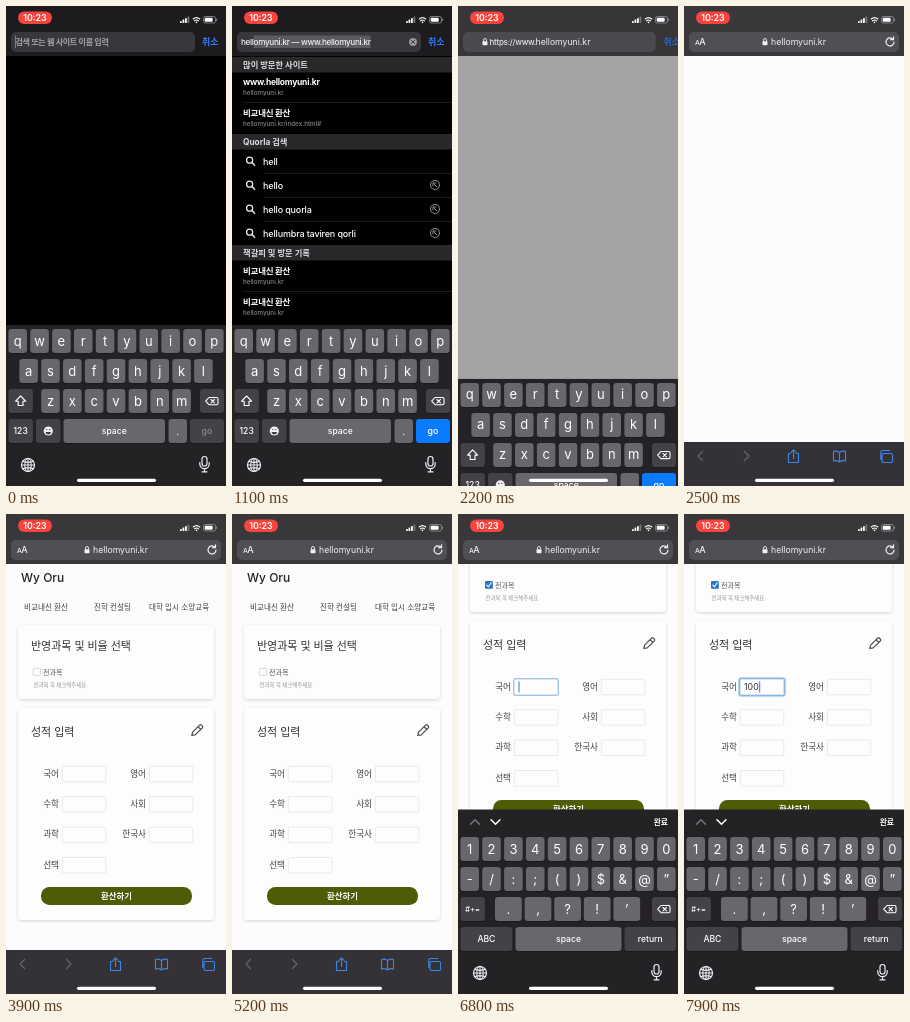
An HTML page that plays this animation: 220 by 480 pixels, repeating every 8000 ms.

```html
<!DOCTYPE html>
<html lang="ko">
<head>
<meta charset="utf-8">
<title>Grade form on a phone</title>
<style>
html, body { margin: 0; width: 100%; height: 100%; overflow: hidden; background: #000; }
svg { display: block; width: 100vw; height: 100vh; }
text { font-family: Inter, "Noto Sans CJK KR", "Noto Sans CJK", sans-serif; white-space: pre; }
.line { fill: none; stroke-linecap: round; stroke-linejoin: round; }
</style>
</head>
<body>
<svg id="stage" viewBox="0 0 220 480" preserveAspectRatio="none"></svg>
<script>
const LOOP = 8000, STEP = 100;
const DOMAIN = 'hellomyuni.kr';
const KEY = '#69676b', DARK = '#444246', BLUE = '#0a7aff';

// Drawing helpers
const rect = (x, y, w, h, fill, r = 0, more = '') =>
  `<rect x="${x}" y="${y}" width="${w}" height="${h}" rx="${r}" fill="${fill}" ${more}/>`;
const text = (x, y, size, str, fill = '#fff', more = '') =>
  `<text x="${x}" y="${y}" font-size="${size}" fill="${fill}" ${more}>${str}</text>`;
const line = (d, color = '#fff', w = 1) =>
  `<path class="line" d="${d}" stroke="${color}" stroke-width="${w}"/>`;
const dot = (x, y, r, fill) => `<circle cx="${x}" cy="${y}" r="${r}" fill="${fill}"/>`;
const ring = (x, y, r, color, w = 1) =>
  `<circle cx="${x}" cy="${y}" r="${r}" fill="none" stroke="${color}" stroke-width="${w}"/>`;
const group = (id, body) => `<g id="${id}">${body}</g>`;
const MID = 'text-anchor="middle"', END = 'text-anchor="end"';
const BOLD = 'font-weight="700"', SEMI = 'font-weight="600"', MEDIUM = 'font-weight="500"';

const lock = (x, y) => rect(x - 2.5, y - .8, 5, 4, '#f2f0f4', .8) +
  line(`M${x - 1.5} ${y - .8}v-1.2a1.5 1.5 0 0 1 3 0v1.2`, '#f2f0f4', .9);

// Keyboards
const SPAN = 21.85;
const rowY = [323, 353, 383, 413];
const keyX = (i, inset = 0) => 2.4 + inset + i * SPAN;

function key(x, row, w, label, fill = KEY, size = 13, color = '#fff') {
  const y = rowY[row];
  return rect(x, y + .8, w, 24, '#19171a', 3.2) + rect(x, y, w, 24, fill, 3.2) +
    text(x + w / 2, y + 12 + size * .35, size, label, color, `${MID} ${size < 10 ? MEDIUM : ''}`);
}
const keyRow = (chars, row, inset = 0) =>
  [...chars].map((c, i) => key(keyX(i, inset), row, 18.6, c === '&' ? '&amp;' : c)).join('');

const backspace = key(194, 2, 24, '', DARK) +
  line('M203 391.5h7.6q1.4 0 1.4 1.4v4.4q0 1.4-1.4 1.4H203l-3.3-3.6zM205 393.5l3.4 3.4m0-3.4l-3.4 3.4', '#fff', 1.1);
const globe = ring(22, 459, 6.5, '#f0eef2', 1.2) +
  line('M15.4 459h13.2M22 452.4v13.2M16.7 455.2q5.3 2.4 10.6 0M16.7 462.8q5.3-2.4 10.6 0', '#f0eef2', 1.1) +
  '<ellipse cx="22" cy="459" rx="3.2" ry="6.5" fill="none" stroke="#f0eef2" stroke-width="1.1"/>';
const mic = rect(196, 450.5, 5, 9.5, 'none', 2.5, 'stroke="#f0eef2" stroke-width="1.2"') +
  line('M193.8 456.5v1.5a4.7 4.7 0 0 0 9.4 0v-1.5M198.5 462.8v3M196 465.8h5', '#f0eef2', 1.2);
const emoji = dot(42.3, 425, 4.6, '#f2f0f4') + dot(40.8, 423.6, .7, DARK) + dot(43.8, 423.6, .7, DARK) +
  `<path d="M39.6 426h5.4a2.7 2.4 0 0 1-5.4 0z" fill="${DARK}"/>`;

const letters = rect(0, 319, 220, 161, '#252226') +
  keyRow('qwertyuiop', 0) + keyRow('asdfghjkl', 1, SPAN / 2) + keyRow('zxcvbnm', 2, SPAN * 1.5) +
  key(2.4, 2, 24.5, '', DARK) + line('M14.6 390l5 5.2h-2.6v4.3h-4.8v-4.3h-2.6z', '#fff', 1.1) +
  backspace + key(2.4, 3, 24.5, '123', DARK, 8.6) + key(30, 3, 24.5, '', DARK) + emoji +
  key(57.5, 3, 101.5, 'space', KEY, 8.6) + key(162.5, 3, 18.5, '.', KEY, 10) +
  group('goOff', key(184, 3, 34, 'go', DARK, 8.8, '#89878b')) +
  group('goOn', key(184, 3, 34, 'go', BLUE, 8.8)) + globe + mic;

const numbers = rect(0, 295.5, 220, 184.5, '#252226') +
  line('M12.5 310.3l4.5-4.6 4.5 4.6', '#79777b', 1.5) +
  line('M33 305.7l4.5 4.6 4.5-4.6', '#fff', 1.5) +
  text(210, 311, 7.8, '완료', '#fff', `${BOLD} ${END}`) +
  keyRow('1234567890', 0) + keyRow('-/:;()$&@”', 1) + key(2.4, 2, 24.5, '#+=', DARK, 7.4) +
  [...'.,?!’'].map((c, i) => key(37 + i * 29.6, 2, 26.8, c)).join('') + backspace +
  key(2.4, 3, 52, 'ABC', DARK, 8.6) + key(57.5, 3, 106, 'space', KEY, 8.6) +
  key(166.5, 3, 51.5, 'return', DARK, 8.6) + globe + mic;

function balloon(char, x, row) {
  const y = rowY[row], left = Math.min(Math.max(x - 5, 2), 189.5);
  return rect(x, y - 8, 18.6, 32, KEY, 3.2) + rect(left, y - 33, 28.6, 30, KEY, 5) +
    text(left + 14.3, y - 11.5, 18, char, '#fff', MID);
}

// Suggestion list
const header = (y, str) => rect(0, y, 220, 15.5, '#2a282b') + text(11, y + 10.7, 8.3, str, '#dddbdf', BOLD);
const bookmark = (y, title, url) => text(11, y, 8.5, title, '#fff', `${BOLD} letter-spacing="-.25"`) +
  text(11, y + 10, 6.2, url, '#77757a', SEMI);
const rule = (x, y) => rect(x, y, 220 - x, .6, '#2d2b2e');
const query = (y, str, id) => ring(17.6, y - 4.8, 3, '#e4e2e6', 1.3) +
  line(`M20 ${y - 2.4}l2.6 2.6`, '#e4e2e6', 1.5) +
  text(31, y - .5, 9, str, '#fff', `${id ? `id="${id}" ` : ''}${MEDIUM} letter-spacing="-.15"`);
const fillIn = y => ring(203, y, 4.5, '#8b898d', 1.1) + line(`M205 ${y + 2}l-4-4m0 3v-3h3`, '#8b898d');

const list = header(51, '많이 방문한 사이트') + bookmark(79, 'www.' + DOMAIN, DOMAIN) + rule(11, 96) +
  bookmark(109.5, '비교내신 환산', DOMAIN + '/index.html#') +
  header(128, 'Quorla 검색') + query(159, 'hell', 'typed') + query(183, 'hello') +
  query(207, 'hello quorla') + query(231, 'hellumbra taviren qorli') +
  [167, 191, 215].map(y => rule(31, y)).join('') + [179, 203, 227].map(fillIn).join('') +
  header(239, '책갈피 및 방문 기록') + bookmark(268, '비교내신 환산', DOMAIN) + rule(11, 285) +
  bookmark(299, '비교내신 환산', DOMAIN);

// Web page
const card = (y, h) => rect(12, y, 196, h, '#fefdfe', 4, 'filter="url(#shade)"');
const field = (x, y, label) => text(x - 3, y + 10.5, 8.6, label, '#454345', END) +
  rect(x + .3, y + .3, 43.5, 15.5, '#fefdfe', .5, 'stroke="#e6e4e7" stroke-width=".8"');
const rows = [['국어', '영어'], ['수학', '사회'], ['과학', '한국사'], ['선택']];

const page = text(15, 68, 12, 'Wy Oru', '#222', MEDIUM) +
  text(18, 96, 7.6, '비교내신 환산', '#444') + text(88, 96, 7.6, '진학 컨설팅', '#444') +
  text(143, 96, 7.6, '대학 입시 소양교육', '#444') +
  card(111, 74) + text(25, 136, 11, '반영과목 및 비율 선택', '#333', MEDIUM) +
  rect(27.4, 154.4, 7, 7, '#fff', .8, 'stroke="#c9c7c9" stroke-width=".7"') +
  group('check', rect(27, 154, 7.8, 7.8, '#2878c8', 1) + line('M28.8 158l1.6 1.8 2.8-4', '#fff', 1.1)) +
  text(37, 160.8, 7, '전과목', '#555') + text(27.5, 173, 5.4, '전과목 꼭 체크해주세요.', '#959395') +
  card(194, 212) + text(25, 222, 11, '성적 입력', '#333', MEDIUM) +
  line('M185.8 221.5l.8-3.4 7-7q1-.8 2 .2l.8.8q.8 1 0 1.8l-7.2 7zM192 212.7l2.8 2.8', '#4c4a4c', 1.2) +
  rows.map((r, i) => r.map((s, j) => field(56 + j * 87, 252 + i * 30.4, s)).join('')).join('') +
  group('focus', rect(55.5, 251.5, 45, 17, '#fff', 1.5, 'id="glow" stroke="#a5cbee" stroke-width="2.6"') +
    rect(55.8, 251.8, 44.4, 16.4, '#fefdfe', 1, 'stroke="#6ea5d8" stroke-width=".9"') +
    text(60, 263.2, 8.8, '', '#333', 'id="score"') + rect(60.5, 254.5, 1, 11, '#3d72d6', 0, 'id="scoreCaret"')) +
  rect(35, 373, 151, 18, '#4d5c05', 8.5) + text(110.5, 385, 8.4, '환산하기', '#fff', `${SEMI} ${MID}`);

const toolbar = rect(0, 436, 220, 44, '#343236') +
  line('M18.5 445.5l-4.5 4.5 4.5 4.5M60.5 445.5l4.5 4.5-4.5 4.5', '#67656a', 1.2) +
  line('M106.500 447.500h-2v9h10v-9h-2M109.500 452.500v-8.500m-2.500 2.300l2.500-2.500 2.500 2.500'.replace(/00\b/g, '') +
    'M155.5 446.5q-3-2-6-1v9.5q3-1 6 1 3-2 6-1v-9.5q-3-1-6 1v9.5' +
    'M199.5 447.5h7.5q1.5 0 1.5 1.5v6q0 1.5-1.5 1.5h-7.5q-1.5 0-1.5-1.5v-6q0-1.5 1.5-1.5z' +
    'M196.8 453.5v-7q0-2 2-2h7', '#3c86e8', 1.1);

// Top bar
const status = rect(12, 5.5, 34, 12.5, '#f8443c', 6.2) + text(29, 15, 8.8, '10:23', '#fff', `${SEMI} ${MID}`) +
  [2, 3.5, 5, 6.5].map((h, i) => rect(174 + i * 2.5, 17 - h, 1.8, h, i < 3 ? '#fff' : '#77757a', .4)).join('') +
  line('M187.2 13q3.3-2.8 6.6 0M188.6 14.8q1.9-1.5 3.8 0', '#fff', 1.1) + dot(190.5, 16.4, .8, '#fff') +
  rect(197.5, 10.5, 12, 6.5, 'none', 1.8, 'stroke="#96949a" stroke-width=".8"') +
  rect(198.7, 11.7, 8, 4.1, '#fff', 1) + rect(210.2, 12.6, .9, 2.3, '#96949a', .4);

const topBar = rect(0, 0, 220, 50, '#1d1b1e') + rect(0, 0, 220, 50, '#39373a', 0, 'id="barLight"') + status +
  rect(5, 26, 184, 20, '#39373b', 5, 'id="box"') + rect(5, 26, 184, 20, '#514f53', 5, 'id="boxLight"') +
  group('entry',
    text(9.5, 39, 8.1, '검색 또는 웹 사이트 이름 입력', '#a3a1a6', `id="hint" ${BOLD} letter-spacing="-.35"`) +
    rect(9, 29.5, .8, 12.5, '#8f929c', 0, 'id="caret"') +
    group('auto', rect(21, 29.5, 117, 12.5, '#5b5a60', 0, 'id="mark"') +
      text(9, 39, 8.2, `${DOMAIN} — www.${DOMAIN}`, '#f2f0f4', `id="url" ${MEDIUM} letter-spacing="-.33"`) +
      dot(181, 36, 3.9, '#98969b') + line('M179.5 34.5l3 3m0-3l-3 3', '#39373b', .9))) +
  group('prefix', lock(27, 36) + text(78, 39, 8, 'https://www.', '#e6e4e8', `${END} ${MEDIUM} letter-spacing="-.25"`)) +
  text(77.5, 39, 8.7, DOMAIN, '#f2f0f4', 'id="domain"') +
  group('tools', lock(81, 36) + text(11, 39, 6.8, 'A', '#f2f0f4', MEDIUM) + text(15.3, 39, 9, 'A', '#f2f0f4', MEDIUM) +
    line('M209 33.3a4 4 0 1 0 1 2.7M209.5 30.8v2.9h-2.9', '#f2f0f4', 1.2)) +
  text(196, 39.3, 9, '취소', '#2f7cf6', `id="cancel" ${SEMI}`);

const stage = document.getElementById('stage');
stage.innerHTML =
  `<defs><clipPath id="view">${rect(0, 50, 220, 386, '#000')}</clipPath>
  <filter id="shade" x="-10%" y="-10%" width="120%" height="125%">
  <feDropShadow dx="0" dy="1" stdDeviation="1.6" flood-opacity=".16"/></filter></defs>` +
  rect(0, 0, 220, 480, '#000') + group('list', list) + rect(0, 50, 220, 386, '#fdfbfd', 0, 'id="paper"') +
  `<g clip-path="url(#view)">${group('page', page)}</g>` + group('toolbar', toolbar) +
  group('letters', letters) + group('numbers', numbers) + group('pop', '') + topBar +
  rect(71, 472.7, 79, 3.2, '#fff', 1.6);

// Motion
const el = {};
stage.querySelectorAll('[id]').forEach(e => el[e.id] = e);
const show = (e, on) => e.setAttribute('visibility', on ? 'inherit' : 'hidden');
const fade = (e, a) => e.setAttribute('opacity', Math.max(0, Math.min(1, a)));
const move = (e, x, y) => e.setAttribute('transform', `translate(${x} ${y})`);

function track(points, t) {
  const i = points.findIndex(p => p[0] > t);
  if (i === 0) return points[0][1];
  if (i < 0) return points[points.length - 1][1];
  const [a, b] = [points[i - 1], points[i]];
  return a[1] + (b[1] - a[1]) * (t - a[0]) / (b[0] - a[0]);
}

const leave = [[2000, 0], [2100, .08], [2200, .335], [2300, .66], [2400, .88], [2500, 1]];
const whiten = [[2000, 0], [2100, .3], [2200, .65], [2300, .86], [2400, 1]];
const focusIn = [[6400, 0], [6500, .2], [6600, .7], [6700, .94], [6800, 1]];
const presses = [
  [300, 'h', keyX(5, SPAN / 2), 1], [500, 'e', keyX(2), 0],
  [700, 'l', keyX(8, SPAN / 2), 1], [900, 'l', keyX(8, SPAN / 2), 1],
  [7300, '1', keyX(0), 0], [7500, '0', keyX(9), 0], [7700, '0', keyX(9), 0]
];
const typedAt = (t, from, to) =>
  presses.filter(p => p[0] >= from && p[0] < to && p[0] <= t).map(p => p[1]).join('');

function draw(t) {
  const p = track(leave, t), f = track(focusIn, t);
  const word = typedAt(t, 0, 2000), score = typedAt(t, 7000, LOOP);
  const browsing = t > 2000, n = word.length;

  show(el.list, n && !browsing);
  show(el.hint, !n);
  show(el.caret, !n);
  show(el.auto, n);
  show(el.entry, !browsing);
  show(el.goOn, n);
  show(el.goOff, !n);
  el.typed.textContent = word;
  if (n) {
    const start = 9 + el.url.getSubStringLength(0, n), end = 9 + el.url.getComputedTextLength();
    el.mark.setAttribute('x', start);
    el.mark.setAttribute('width', end - start);
  }
  // Nested parts inherit from the entry group, which may be hidden.
  if (browsing) for (const e of [el.hint, el.caret, el.auto]) show(e, false);

  fade(el.barLight, p * 2.8);
  fade(el.boxLight, p * 2.4);
  for (const b of [el.box, el.boxLight]) b.setAttribute('width', 184 + 26 * p);
  show(el.prefix, browsing);
  show(el.domain, browsing);
  const shift = 14.3 * (p - .335);
  move(el.prefix, shift, 0);
  move(el.domain, shift, 0);
  fade(el.prefix, (.85 - p) * 2);
  fade(el.tools, p * 2 - 1);
  fade(el.cancel, 1 - p);
  move(el.cancel, 28 * p, 0);

  fade(el.paper, track(whiten, t));
  show(el.toolbar, browsing);
  show(el.letters, p < 1);
  move(el.letters, 0, 161 * p);

  show(el.page, t >= 2700);
  move(el.page, 0, -87 * f);
  show(el.check, t >= 5400);
  show(el.focus, f > 0);
  fade(el.glow, (t - 6800) / 300);
  el.score.textContent = score;
  el.scoreCaret.setAttribute('x', 60.5 + (score ? el.score.getComputedTextLength() : 0));
  show(el.numbers, f > 0);
  move(el.numbers, 0, 184.5 * (1 - f));

  const hit = presses.find(k => t >= k[0] && t < k[0] + STEP);
  el.pop.innerHTML = hit ? balloon(hit[1], hit[2], hit[3]) : '';
}

let last = -1;
function tick() {
  const t = Math.floor(performance.now() % LOOP / STEP) * STEP;
  if (t !== last) draw(last = t);
  requestAnimationFrame(tick);
}
tick();
</script>
</body>
</html>
```
